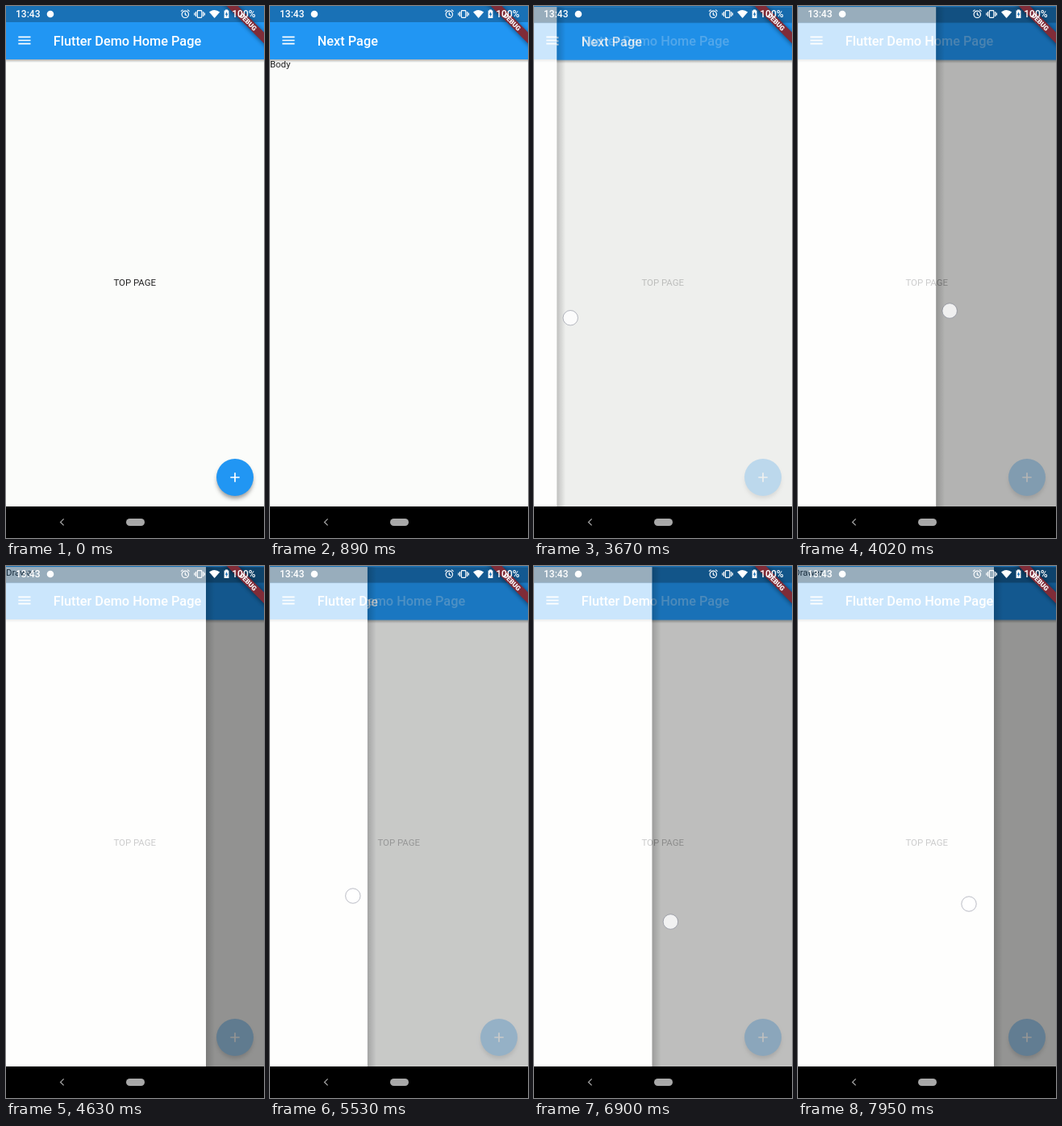
An HTML page that plays this animation: 320x658 px, repeating every 7990 ms.

```html
<!DOCTYPE html>
<html lang="en">
<head>
<meta charset="utf-8">
<title>Drawer demo</title>
<style>
  html, body { margin: 0; width: 100%; height: 100%; overflow: hidden; background: #000; }
  svg { display: block; width: 100%; height: 100%; font-family: Roboto, sans-serif; }
  .title { font-size: 16.3px; font-weight: 500; fill: #fff; }
  .body { font-size: 11.4px; fill: #222; }
  .status { font-size: 12px; font-weight: 500; fill: #fff; }
  .line { fill: none; stroke: #fff; }
  .blue { fill: #2196f3; }
  .shade { fill: #000; opacity: .25; }
</style>
</head>
<body>
<svg viewBox="0 0 320 658">
  <defs>
    <clipPath id="app"><rect width="320" height="619"/></clipPath>
    <linearGradient id="edgeShade">
      <stop stop-opacity=".26"/>
      <stop offset="1" stop-opacity="0"/>
    </linearGradient>
    <linearGradient id="barShade" x2="0" y2="1">
      <stop stop-opacity=".3"/>
      <stop offset="1" stop-opacity="0"/>
    </linearGradient>
    <filter id="soft" x="-50%" y="-50%" width="200%" height="200%"><feGaussianBlur stdDeviation="2.6"/></filter>
    <!-- background, app bar and menu button shared by both pages -->
    <g id="scaffold">
      <rect width="320" height="619" fill="#fbfcfa"/>
      <rect y="66" width="320" height="4" fill="url(#barShade)"/>
      <rect class="blue" width="320" height="66"/>
      <rect class="shade" width="320" height="20"/>
      <path class="line" stroke-width="1.7" d="M15.3 38.3h15.2M15.3 42.5h15.2M15.3 46.7h15.2"/>
    </g>
  </defs>

  <g clip-path="url(#app)">
    <use href="#scaffold"/>
    <text class="title" x="58.8" y="48.5">Flutter Demo Home Page</text>
    <text class="body" x="159.7" y="346" text-anchor="middle">TOP PAGE</text>
    <circle cx="284" cy="587" r="22.5" fill="#444" opacity=".5" filter="url(#soft)"/>
    <circle class="blue" cx="284" cy="583" r="23"/>
    <circle id="splash" cx="284" cy="583" fill="#fff"/>
    <path class="line" stroke-width="1.7" d="M278.3 583h11.4M284 577.3v11.4"/>

    <g id="next">
      <use href="#scaffold"/>
      <text class="title" x="58.8" y="48.5">Next Page</text>
      <text class="body" x="0" y="76">Body</text>
      <rect id="scrim" width="320" height="619"/>
      <g id="drawer">
        <rect x="248" width="11" height="619" fill="url(#edgeShade)"/>
        <rect width="248" height="619" fill="#fff"/>
        <text class="body" x="0" y="11">Drawer</text>
        <rect class="shade" width="248" height="20"/>
      </g>
    </g>
  </g>

  <!-- debug ribbon -->
  <g transform="translate(320 0) rotate(45)">
    <rect x="-45" y="22.9" width="90" height="11" opacity=".4" filter="url(#soft)"/>
    <rect x="-45" y="22.9" width="90" height="9.8" fill="#802c38"/>
    <text y="30.8" text-anchor="middle" font-size="8.3" font-weight="900" fill="#fff">DEBUG</text>
  </g>

  <!-- status icons -->
  <text class="status" x="12" y="14.2">13:43</text>
  <circle cx="55" cy="10" r="4.3" fill="#fff"/>
  <g class="line" stroke-width="1.2">
    <circle cx="222.3" cy="10.3" r="4.2"/>
    <path d="M222.3 7.8v2.8l1.9 1.1M217 6.6l2.5-2M227.6 6.6l-2.5-2"/>
    <rect x="237.4" y="5.6" width="5.4" height="8.8" rx=".8"/>
    <path d="M235.5 7v6M233.8 8.4v3.2M244.7 7v6M246.4 8.4v3.2"/>
  </g>
  <path fill="#fff" d="M252 7.5q6.6-5 13.2 0L258.6 15z"/>
  <path fill="#fff" d="M272 4.6h3v1h1.4v9.4h-5.8V5.6H272z"/>
  <path fill="#1971b6" d="M274 7l-2.2 3.7h1.4v2.8l2.2-3.9H274z"/>
  <text class="status" x="280.3" y="14.2">100%</text>

  <!-- navigation bar -->
  <rect y="619" width="320" height="39"/>
  <path fill="none" stroke="#a8a8a8" stroke-width="1.3" d="M71.6 634.4l-4 4 4 4"/>
  <rect x="149" y="634" width="23" height="9" rx="4.5" fill="#a8a8a8"/>

  <circle id="finger" r="9.2" fill="#fff" fill-opacity=".8" stroke="#555a70" stroke-opacity=".4"/>
</svg>

<script>
const LOOP = 7990, DRAWER_WIDTH = 248, SETTLE = 240;

const tap = { path: [[260, 284, 583], [430, 284, 583]] };
const edgeSwipe = { path: [[1660, 4, 400], [2140, 50, 400]] };

// Path points are [time, x, y]; lag is how far the drawer's edge trails the finger.
const drags = [
  { path: [[3580, 8, 388], [4020, 188, 377], [4390, 238, 372]], lag: 17, goal: DRAWER_WIDTH },
  { path: [[5110, 245, 398], [5530, 103, 408], [6130, 13, 417]], lag: -18, goal: 0 },
  { path: [[6480, 6, 448], [6900, 169, 440], [6980, 200, 438]], lag: 23, goal: DRAWER_WIDTH },
  { path: [[7860, 230, 417], [7950, 212, 418], [LOOP, 212, 418]], lag: -31, goal: 0 }
];
const touches = [tap, edgeSwipe, ...drags];

const set = (id, attrs) => {
  for (const name in attrs) document.getElementById(id).setAttribute(name, attrs[name]);
};
const clamp = (v, max = 1) => Math.min(max, Math.max(0, v));
const span = (t, from, to) => clamp((t - from) / (to - from));
const mix = (a, b, k) => a + (b - a) * k;
const startOf = touch => touch.path[0][0];
const endOf = touch => touch.path[touch.path.length - 1][0];

function fingerAt({ path }, t) {
  const i = Math.max(1, path.findIndex(point => point[0] >= t));
  const [t0, x0, y0] = path[i - 1], [t1, x1, y1] = path[i];
  const k = span(t, t0, t1);
  return [mix(x0, x1, k), mix(y0, y1, k)];
}

// The drawer follows the finger, then eases to its open or closed position.
function drawerWidth(t) {
  const drag = drags.filter(d => t >= startOf(d)).pop();
  if (!drag) return 0;
  const end = endOf(drag);
  const held = clamp(fingerAt(drag, Math.min(t, end))[0] - drag.lag, DRAWER_WIDTH);
  return mix(held, drag.goal, 1 - (1 - span(t, end, end + SETTLE)) ** 2);
}

function draw(t) {
  const ripple = span(t, 420, 640);
  set('splash', { r: 23 * ripple, opacity: 0.25 * Math.sin(Math.PI * ripple) });

  // The page fades in while rising; the edge swipe leaves it slightly pulled back.
  const shown = span(t, 560, 880) - 0.14 * span(t, startOf(edgeSwipe), endOf(edgeSwipe));
  set('next', {
    opacity: shown ** 1.75,
    transform: `translate(0 ${155 * (1 - shown) ** 2.5})`
  });

  const width = drawerWidth(t);
  set('scrim', { opacity: 0.54 * width / DRAWER_WIDTH });
  set('drawer', {
    transform: `translate(${width - DRAWER_WIDTH} 0)`,
    visibility: width > 0 ? 'visible' : 'hidden'
  });

  const touch = touches.find(p => t >= startOf(p) && t < endOf(p));
  set('finger', { visibility: touch ? 'visible' : 'hidden' });
  if (touch) {
    const [cx, cy] = fingerAt(touch, t);
    set('finger', { cx, cy });
  }
}

const start = performance.now();
function tick() {
  draw((performance.now() - start) % LOOP);
  requestAnimationFrame(tick);
}
tick();
</script>
</body>
</html>
```
